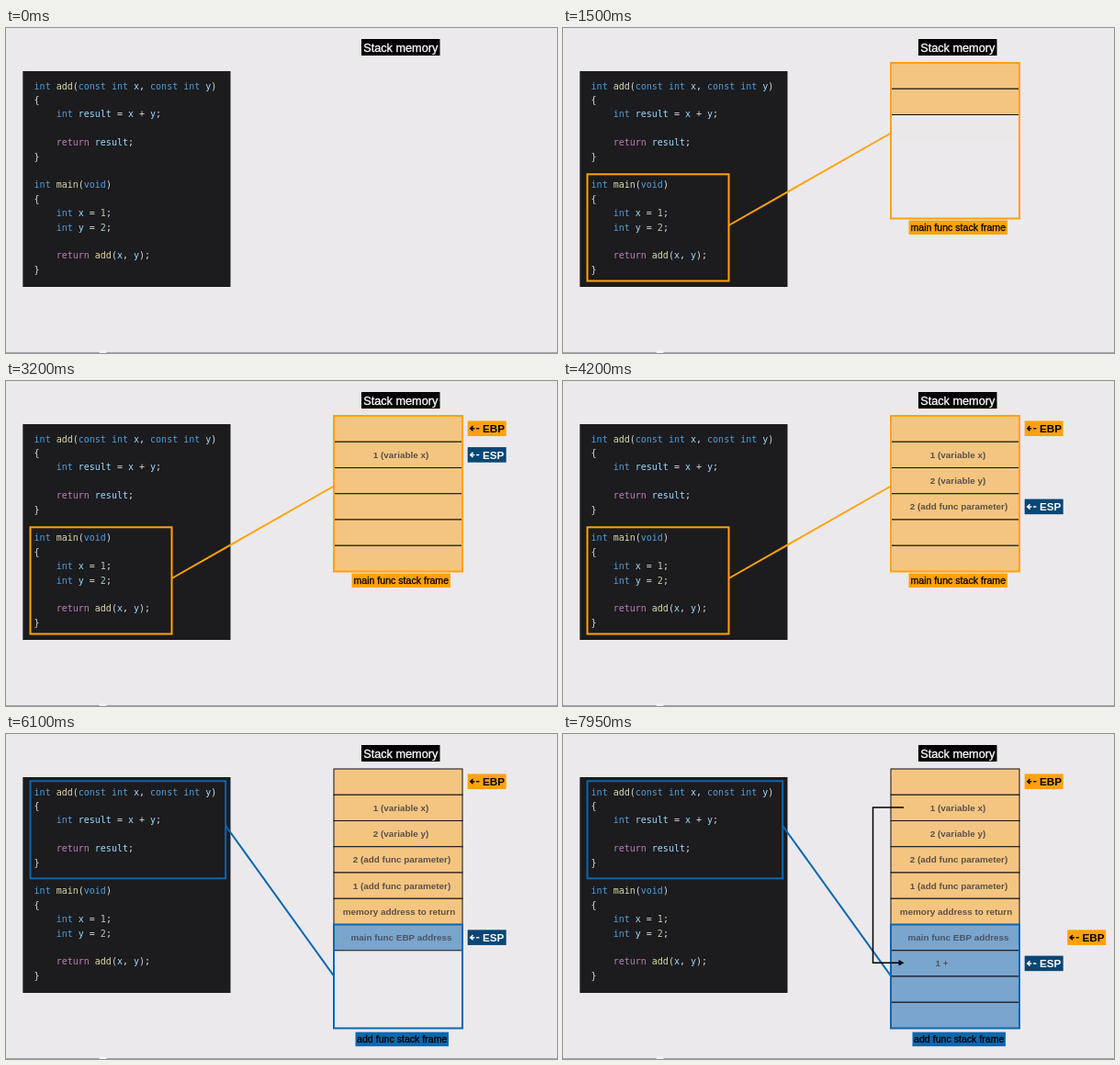
An HTML page that plays this animation: 600x354 px, repeating every 8 s.

```html
<!DOCTYPE html>
<html lang="en">
<head>
<meta charset="utf-8">
<title>Stack memory</title>
<style>
  html, body { margin: 0; width: 100%; height: 100%; overflow: hidden; background: #ebe9ec; }
  svg { display: block; width: 600px; height: 354px; }
  text { font-family: "Liberation Sans", Arial, sans-serif; white-space: pre; }
  .code { font: 10px "DejaVu Sans Mono", monospace; }
  .mid { text-anchor: middle; }
  .medium { stroke-width: .3; paint-order: stroke; }
</style>
</head>
<body>
<svg id="stage" viewBox="0 0 600 354"></svg>
<script>
const LOOP = 8000, FADE = 120, SLIDE = 200;
const ORANGE = '#ffa20a', BLUE = '#0c67ad', NAVY = '#094673';
const CELL = { x: 357, y: 38, w: 140, h: 28.25 };
const stage = document.getElementById('stage');
const fades = [];

function el(tag, attrs, parent = stage, text) {
  const node = document.createElementNS('http://www.w3.org/2000/svg', tag);
  for (const key in attrs) node.setAttribute(key, attrs[key]);
  if (text !== undefined) node.textContent = text;
  parent.appendChild(node);
  return node;
}
const group = () => el('g', {});
const rect = (x, y, width, height, attrs, parent) =>
  el('rect', { x, y, width, height, ...attrs }, parent);
const show = (node, from, to = Infinity) => { fades.push({ node, from, to }); return node; };
const cellMid = i => CELL.y + CELL.h * (i + .5);

// Source listing: k keyword, f function, v variable, r return, n number, p punctuation
const COLORS = { k: '#4f9fdb', f: '#dcdcaa', v: '#9cdcfe', r: '#c07fb8', n: '#b5cea8', p: '#d8d8d8' };
const LISTING = [
  'k:int |f:add|p:(|k:const int |v:x|p:, |k:const int |v:y|p:)',
  'p:{',
  'k:    int |v:result |p:= |v:x |p:+ |v:y|p:;',
  '',
  'r:    return |v:result|p:;',
  'p:}',
  '',
  'k:int |f:main|p:(|k:void|p:)',
  'p:{',
  'k:    int |v:x |p:= |n:1|p:;',
  'k:    int |v:y |p:= |n:2|p:;',
  '',
  'r:    return |f:add|p:(|v:x|p:, |v:y|p:);',
  'p:}'
];

function drawCode() {
  rect(18.3, 47, 226.2, 235, { fill: '#1c1b1e' });
  LISTING.forEach((line, i) => {
    const row = el('text', { class: 'code', x: 30.6, y: 66.6 + i * 15.4 });
    if (line) line.split('|').forEach(part =>
      el('tspan', { fill: COLORS[part[0]] }, row, part.slice(2)));
  });
}

function drawLabel(x, y, w, h, text, size, fill, ink, parent) {
  rect(x, y, w, h, { fill }, parent);
  el('text', { class: 'mid medium', x: x + w / 2, y: y + h / 2 + size * .36,
    'font-size': size, fill: ink, stroke: ink }, parent, text);
}

function drawCell(i, fill, from) {
  show(rect(CELL.x, CELL.y + i * CELL.h, CELL.w, CELL.h, { fill, stroke: '#111', 'stroke-width': 1 }), from);
}

function drawValue(i, text, from, x = 428) {
  show(el('text', { class: 'mid', x, y: cellMid(i) + 3.6, 'font-size': 9.9,
    'font-weight': 'bold', fill: i < 6 ? '#5b5147' : '#4b5663' }, stage, text), from);
}

function drawFrame({ color, box, link, first, count, label, from, to }) {
  const g = show(group(), from, to);
  const line = { fill: 'none', stroke: color, 'stroke-width': 2 };
  rect(...box, line, g);
  el('path', { d: link, ...line }, g);
  rect(CELL.x, CELL.y + first * CELL.h, CELL.w, CELL.h * count, line, g);
  drawLabel(...label, 10.6, color, '#000', g);
}

function drawPointer(name, fill, ink, from) {
  const g = show(group(), from);
  rect(0, -8.3, 42, 16.6, { fill }, g);
  el('path', { d: 'M5.8 -2.6L3 0L5.8 2.6M3.4 0H7.6M9.4 0H12.6', fill: 'none', stroke: ink, 'stroke-width': 1.5 }, g);
  el('text', { x: 16.3, y: 4.2, 'font-size': 11.7, 'font-weight': 'bold', fill: ink }, g, name);
  return g;
}

drawCode();
drawLabel(387, 12, 85.5, 18, 'Stack memory', 12.7, '#000', '#fff');
rect(0, 353, 600, 1, { fill: '#a5a4a6' });
el('ellipse', { cx: 105.5, cy: 353, rx: 4, ry: 2, fill: '#f4f3f5' });

[500, 1000, 1500, 1650, 1800, 1950].forEach((t, i) => drawCell(i, '#f4c581', t));
[5450, 6500, 6650, 6800].forEach((t, i) => drawCell(6 + i, '#7aa5cd', t));

drawFrame({
  color: ORANGE, box: [26.5, 159.3, 154, 116.2], link: 'M180.5 215L357 114.5',
  first: 0, count: 6, label: [376.5, 209.5, 107.5, 15.5, 'main func stack frame'], from: 500, to: 5250
});
drawFrame({
  color: BLUE, box: [26.5, 51.3, 212.7, 106], link: 'M239.2 100L357 263.5',
  first: 6, count: 4, label: [380.5, 324.7, 101.5, 15.5, 'add func stack frame'], from: 5250
});

drawValue(1, '1 (variable x)', 2950, 430);
drawValue(2, '2 (variable y)', 3650, 430);
drawValue(3, '2 (add func parameter)', 4050, 431);
drawValue(4, '1 (add func parameter)', 4450, 431);
drawValue(5, 'memory address to return', 4850);
drawValue(6, 'main func EBP address', 5750, 430.5);
drawValue(7, '1 +', 7600, 412.5);

const copyArrow = show(group(), 7300);
el('path', { d: 'M371 80H337.5V249.3H367', fill: 'none', stroke: '#000', 'stroke-width': 1.5 }, copyArrow);
el('path', { d: 'M371.5 249.3L365.5 246V252.6Z' }, copyArrow);

const ebp = drawPointer('EBP', ORANGE, '#000', 2450);
const newEbp = drawPointer('EBP', ORANGE, '#000', 6250);
const esp = drawPointer('ESP', NAVY, '#fff', 2150);
const espMoves = [2700, 3500, 3900, 4300, 4700, 5600, 7050];

const clamp = v => Math.max(0, Math.min(1, v));
const ease = v => v * v * (3 - 2 * v);
const slide = (t, start) => ease(clamp((t - start) / SLIDE));
const place = (node, x, y) => node.setAttribute('transform', `translate(${x} ${y})`);

function render(t) {
  for (const { node, from, to } of fades)
    node.setAttribute('opacity', clamp((t - from) / FADE) * (1 - clamp((t - to) / FADE)));
  const espCell = espMoves.reduce((sum, start) => sum + slide(t, start), 0);
  place(esp, 502.7, cellMid(espCell));
  place(ebp, 549.2 - 46.5 * slide(t, 2850), cellMid(0) - .4);
  place(newEbp, 549.2, cellMid(6));
}

const begin = performance.now();
function tick() {
  render((performance.now() - begin) % LOOP);
  requestAnimationFrame(tick);
}
tick();
</script>
</body>
</html>
```
